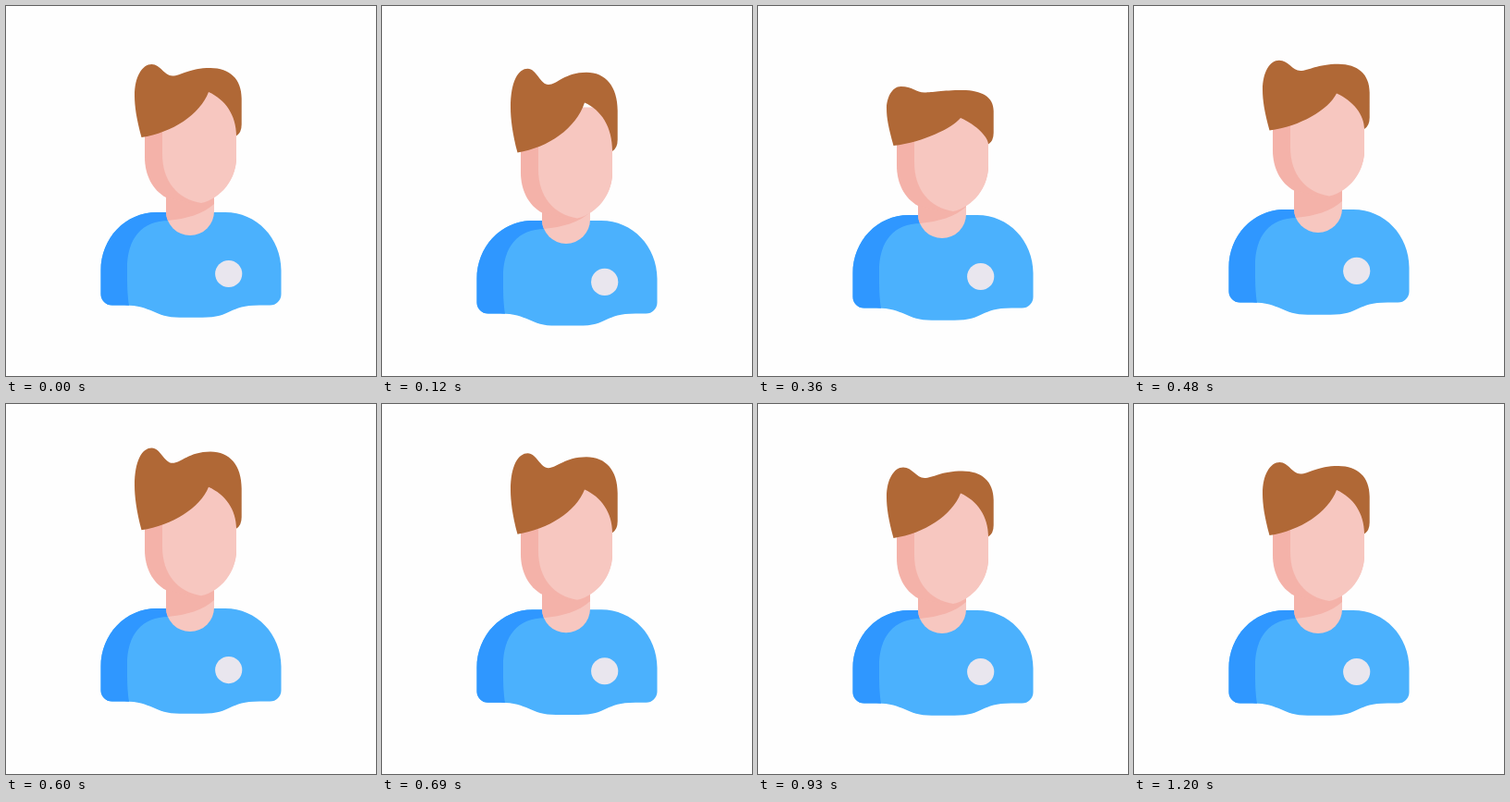
Animation, 400 px wide and 400 px high, one loop 3800 ms. Source, as an HTML page:

```html
<!DOCTYPE html>
<html>
<head>
<meta charset="utf-8">
<style>
  html, body { margin: 0; width: 100%; height: 100%; overflow: hidden; background: #fefefe; }
  svg { display: block; width: 100%; height: 100%; }
  .skin { fill: #f7c7c0; }
  .shade { fill: #f4b2a9; }
</style>
</head>
<body>
<svg viewBox="0 0 400 400">
  <defs>
    <path id="torso" d="M102.5 286C102.5 251 129 223 163 223H237C271 223 297.5 251 297.5 286V311.5A12 12 0 0 1 285.5 323.5H274C240 323.5 245 336.7 212 336.7H188C160 336.7 158 323.5 128 323.5H114.5A12 12 0 0 1 102.5 311.5Z"/>
    <clipPath id="inTorso"><use href="#torso"/></clipPath>
  </defs>
  <g id="body">
    <use href="#torso" fill="#4bb1fd"/>
    <path clip-path="url(#inTorso)" fill="#2f97ff" d="M133 324C131 310 131 300 131 284C131 251 147 232 176 232V220H100V324Z"/>
    <circle cx="240.7" cy="289.5" r="14.6" fill="#e9e6ee"/>
    <path class="skin" d="M173 196V222A26 26 0 0 0 225 222V196Z"/>
    <path class="shade" d="M173 196V222Q173 228 175 232C195 230 213 225 225 214V196Z"/>
  </g>
  <g id="head">
    <path class="shade" d="M150 100H249V163.5A49.5 49.5 0 0 1 199.5 213L173 207C158 199 150 182 150 163.5Z"/>
    <path class="skin" d="M169 93H249V163.5C249 187 233 208 211 213C186 209 169 190 169 160Z"/>
  </g>
  <path id="hair" fill="#b06836"/>
</svg>
<script>
const LOOP = 3800, STEP = 30, END = 1200;

// Turning points [time, drop] of each part; hair follows the head late
const swings = {
  body: [[0, 0], [210, 14.6], [460, -3.1], [800, 0]],
  head: [[0, 0], [210, 27], [505, -8], [840, 3.6], [END, 0]],
  tip:  [[0, 0], [300, 33.5], [540, -4], [860, 4], [END, 0]],
  top:  [[50, 0], [310, 28], [570, -16], [900, 5.7], [END, 0]]
};

// Cosine ease from one turning point to the next
function swing(points, t) {
  let y = 0;
  for (let i = 1; i < points.length; i++) {
    const [t0, y0] = points[i - 1], [t1, y1] = points[i];
    const u = Math.min(1, Math.max(0, (t - t0) / (t1 - t0)));
    y += (y1 - y0) * (1 - Math.cos(Math.PI * u)) / 2;
  }
  return y;
}

function hairPath({ head, top, tip }) {
  const lift = top - head, droop = tip - head;
  const at = (x, y, dy) => `${x} ${y + dy} `;
  const side = head + lift * 0.3, dip = head + lift * 0.6;
  const bump = 157.5 - Math.max(0, lift) * 0.2;
  return 'M' + at(146.5, 142, head)
    + 'C' + at(141, 122, head) + at(139, 108, side) + at(139, 97, side)
    + 'C' + at(139, 76, top) + at(bump - 10, 63, top) + at(bump, 63, top)
    + 'C' + at(167, 63, top) + at(171, 75.5, dip) + at(180, 75.5, dip)
    + 'C' + at(189, 75.5, dip) + at(198, 67, top) + at(221, 67, top)
    + 'C' + at(242, 67, top) + at(254.7, 79, head + lift * 0.7) + at(254.7, 100, side)
    + 'L' + at(254.7, 128, head)
    + 'Q' + at(254.7, 137, head) + at(249, 140.5, head)
    + 'C' + at(249, 118, head + droop * 0.8) + at(237, 101, tip) + at(219, 93, tip)
    + 'C' + at(210, 117, head + droop * 0.3) + at(180, 137, head + droop * 0.05) + at(146.5, 142, head)
    + 'Z';
}

const el = id => document.getElementById(id);
const start = performance.now();

function draw(now) {
  const ms = Math.max(0, now - start) % LOOP;
  const t = Math.min(END, Math.floor(ms / STEP) * STEP);
  const y = {};
  for (const part in swings) y[part] = swing(swings[part], t);
  for (const id of ['body', 'head']) el(id).setAttribute('transform', `translate(0 ${y[id]})`);
  el('hair').setAttribute('d', hairPath(y));
  requestAnimationFrame(draw);
}
draw(start);
</script>
</body>
</html>
```
